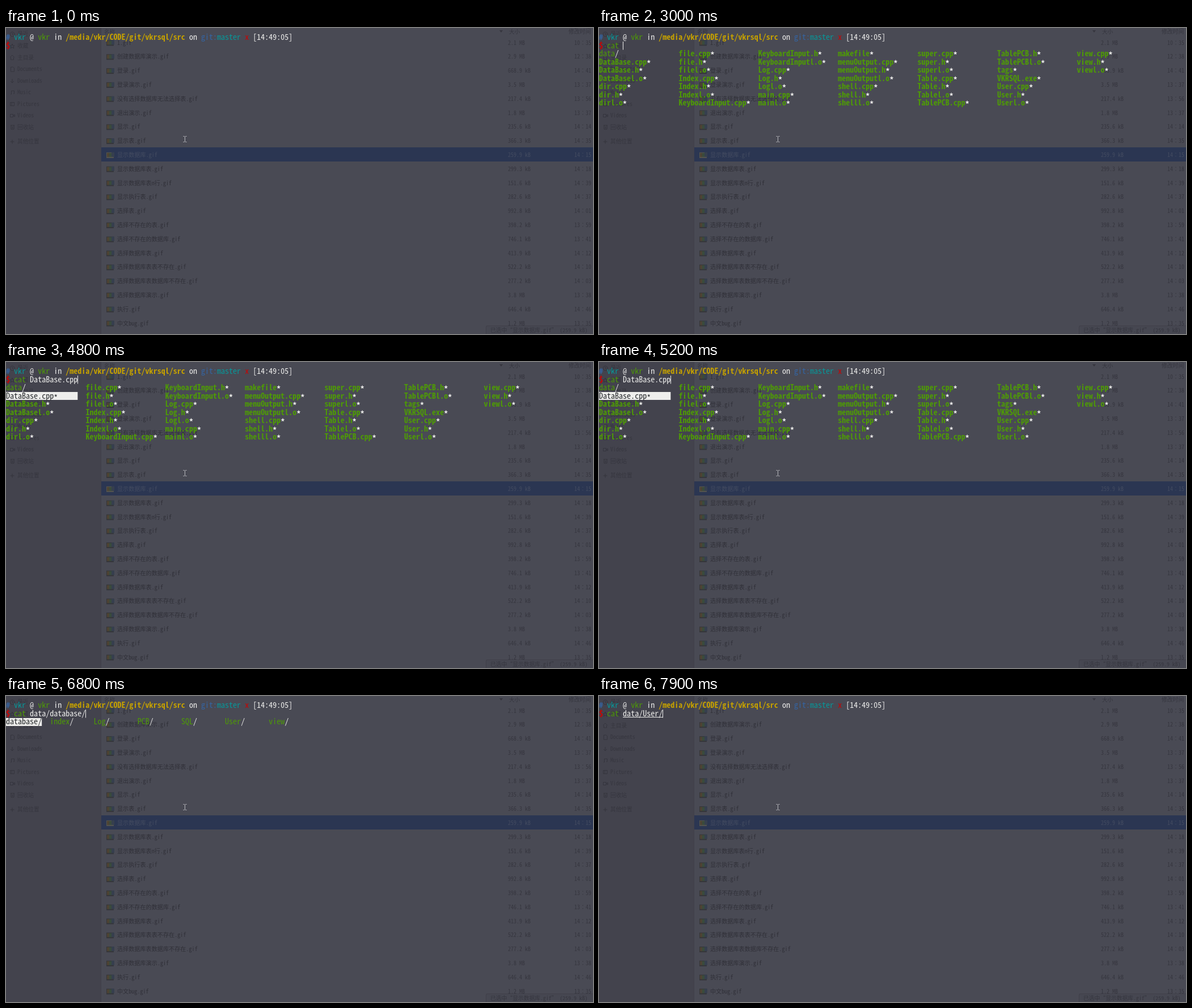
An HTML page that plays this animation: 1035 px wide and 541 px high, repeating every 8000 ms.

```html
<!DOCTYPE html>
<html lang="zh-CN">
<head>
<meta charset="utf-8">
<title>Terminal completion</title>
<style>
html, body { margin: 0; width: 100%; height: 100%; overflow: hidden; background: #494a54; }
svg { display: block; width: 1035px; height: 541px; }
text {
  font-family: "Noto Sans Mono CJK SC", "Noto Sans Mono", "Noto Sans CJK SC", "DejaVu Sans Mono", monospace;
  white-space: pre;
}
.icon { fill: none; stroke: #34343d; stroke-width: 1; }
</style>
</head>
<body>
<svg viewBox="0 0 1035 541">
  <rect width="1035" height="541" fill="#494a54"/>
  <rect width="167" height="541" fill="#43434d"/>
  <rect x="167" width="1" height="541" fill="#40404a"/>
  <rect x="168" y="211" width="867" height="25" fill="#2b3652"/>
  <g id="files"></g>
  <g id="places"></g>
  <g id="prompt"></g>
  <g id="screen"></g>
  <path d="M312.5 191.5h2l1 1 1-1h2M315.500 192v9M312.500 201.500h2l1-1 1 1h2" fill="none" stroke="#b9b9be"/>
</svg>
<script>
const LOOP = 8000, CELL = 7.02, LINE = 14.55, SIZE = CELL * 2;
const C = {
  blue: '#3465a4', cyan: '#06989a', green: '#4e9a06', yellow: '#c4a000',
  red: '#cc0000', white: '#eeeeec', ghost: '#5f5f63', dark: '#303038', dim: '#36363f'
};
const byId = id => document.getElementById(id);

// Latin letters take half an em, whichever monospace font is found.
const pen = document.createElement('canvas').getContext('2d');
pen.font = '100px "Noto Sans Mono CJK SC", "Noto Sans Mono", "DejaVu Sans Mono", monospace';
const spacing = 0.5 - pen.measureText('M').width / 100;

function text(x, y, str, color, size, bold) {
  const runs = str.match(/[ -~]+|[^ -~]+/g) || [];
  const spans = runs.map(run => /[ -~]/.test(run)
    ? `<tspan style="letter-spacing:${(spacing * size).toFixed(3)}px">${run}</tspan>` : run);
  return `<text x="${x}" y="${y}" fill="${color}" font-size="${size}"${bold ? ' font-weight="700"' : ''}>${spans.join('')}</text>`;
}
const rect = (x, y, w, h, color) => `<rect x="${x}" y="${y}" width="${w}" height="${h}" fill="${color}"/>`;
const cell = (col, row, str, color, bold) =>
  text(col * CELL, 21 + row * LINE, str, color, SIZE, bold);

// File manager seen through the terminal
const files = `1|2.1 MB|10:35
创建数据库演示|2.9 MB|12:38
登录|668.9 kB|14:41
登录演示|3.5 MB|13:37
没有选择数据库无法选择表|217.4 kB|13:56
退出演示|1.8 MB|13:37
显示|235.6 kB|14:14
显示表|366.3 kB|14:35
显示数据库|259.9 kB|14:15
显示数据库表|299.3 kB|14:18
显示数据库表n行|151.6 kB|14:39
显示执行表|282.6 kB|14:37
选择表|992.8 kB|14:01
选择不存在的表|398.2 kB|13:59
选择不存在的数据库|746.1 kB|13:41
选择数据库表|413.9 kB|14:12
选择数据库表表不存在|522.2 kB|14:10
选择数据库表数据库不存在|277.2 kB|14:03
选择数据库演示|3.8 MB|13:38
执行|646.4 kB|14:46
中文bug|1.2 MB|13:35`.split('\n').map(line => line.split('|'));

function fileRow([name, size, time], i) {
  const mid = 26 + i * 24.8, y = mid + 3.6, active = i === 8;
  const color = active ? '#444c61' : C.dark;
  return rect(177, mid - 4.5, 13, 10, active ? '#55554f' : '#35363a')
    + rect(178, mid - 3.5, 4, 7, '#4d4334') + rect(182, mid - 3.5, 4, 7, '#3a4b3c')
    + rect(186, mid - 4.5, 5, 8, '#363f4e')
    + text(196, y, name + '.gif', color, 10.15)
    + text(885, y, size, active ? color : C.dim, 10)
    + text(1002, y, time.replace(':', '∶'), active ? color : C.dim, 10);
}

byId('files').innerHTML = files.map(fileRow).join('')
  + text(173, 9.5, '名称', C.dim, 9.6)
  + text(887, 9.5, '大小', C.dim, 9.6)
  + text(992, 9.5, '修改时间', C.dim, 9.8)
  + `<path d="M870 4h6l-3 4z" fill="${C.dim}"/>`
  + rect(846, 526, 189, 15, '#464751')
  + `<path d="M846.500 541v-12q0-2.500 2.500-2.500h186" fill="none" stroke="#40404a"/>`
  + text(854, 537.5, '已选中“显示数据库.gif” (259.9 kB)', C.dim, 9.8);

const places = [
  [11, '最近', 'M11 7a4 4 0 1 0 .1 0M11 9v2h2'],
  [32, '收藏', 'M11 28l1 3h3l-2 2 1 3-3-2-3 2 1-3-2-2h3z'],
  [52.5, '主目录', 'M7 52l4-4 4 4M8.500 52v4h5v-4'],
  [73, 'Documents', 'M8.500 69h4l2 2v6h-6z'],
  [94, 'Downloads', 'M11 90v7M8 94l3 3 3-3'],
  [114, 'Music', 'M9.500 117v-6h5v5M8 117h1.500M13 116h1.500'],
  [135, 'Pictures', 'M7.500 131.500h7v6h-7zM10 132v5'],
  [155, 'Videos', 'M7.500 152.500h5v5h-5zM12.500 155l3-2v4z'],
  [175.5, '回收站', 'M8 172h7M9 172v7h5v-7M11.500 174v4'],
  [201, '其他位置', 'M11 197.500v7M7.500 201h7']
];
byId('places').innerHTML = places.map(([y, label, d]) =>
  `<path class="icon" d="${d}"/>` + text(20, y + 3.4, label, C.dim, 9.7)).join('');

// Shell
const prompt = [
  [0, '#', C.blue, true], [2, 'vkr', C.cyan], [6, '@', C.white], [8, 'vkr', C.green],
  [12, 'in', C.white], [15, '/media/vkr/CODE/git/vkrsql/src', C.yellow, true],
  [46, 'on', C.white], [49, 'git:', C.blue], [53, 'master', C.cyan],
  [60, 'x', C.red], [62, '[14:49:05]', C.white]
];
byId('prompt').innerHTML = prompt.map(([col, str, color, bold]) => cell(col, 0, str, color, bold)).join('')
  + cell(0, 1, '$', C.red, true);

const menus = {
  src: {
    base: '', pitch: 20, width: 18, rows: 7,
    items: `data/ DataBase.cpp* DataBase.h* DataBasel.o* dir.cpp* dir.h* dirl.o*
      file.cpp* file.h* filel.o* Index.cpp* Index.h* Indexl.o* KeyboardInput.cpp*
      KeyboardInput.h* KeyboardInputl.o* Log.cpp* Log.h* Logl.o* main.cpp* mainl.o*
      makefile* menuOutput.cpp* menuOutput.h* menuOutputl.o* shell.cpp* shell.h* shelll.o*
      super.cpp* super.h* superl.o* Table.cpp* Table.h* Tablel.o* TablePCB.cpp*
      TablePCB.h* TablePCBl.o* tags* VKRSQL.exe* User.cpp* User.h* Userl.o*
      view.cpp* view.h* viewl.o*`.split(/\s+/)
  },
  data: {
    base: 'data/', pitch: 11, width: 9, rows: 1,
    items: 'database/ index/ Log/ PCB/ SQL/ User/ view/'.split(' ')
  }
};

function drawMenu(menu, pick) {
  return menu.items.map((item, i) => {
    const col = Math.floor(i / menu.rows) * menu.pitch, row = 2 + i % menu.rows;
    const name = item.slice(0, -1), mark = item.slice(-1);
    const active = i === pick, star = mark === '*', bold = star && !active;
    // The asterisk sits at mid-height, lower than the font places it.
    const markRow = star ? row + 0.2 : row;
    const bar = active
      ? rect(col * CELL, Math.round(9.6 + row * LINE), menu.width * CELL, 14, C.white) : '';
    return bar + cell(col, row, name, active ? '#25282b' : C.green, bold)
      + cell(col + name.length, markRow, mark, active ? '#25282b' : C.white, bold);
  }).join('');
}

const past = 'cat data/SQL/a';
const steps = [
  { at: 0, cmd: '', still: true },
  { at: 100, cmd: 'c', ghost: past.slice(1) },
  { at: 200, cmd: 'ca', ghost: past.slice(2) },
  { at: 500, cmd: 'cat', ghost: past.slice(3) },
  { at: 700, cmd: 'cat ', ghost: past.slice(4) },
  { at: 1200, cmd: 'cat ', ghost: past.slice(4), still: true },
  { at: 1800, cmd: 'cat ', ghost: past.slice(4) },
  { at: 2100, cmd: 'cat /', ghost: 'proc/self/environ', line: true },
  { at: 3000, cmd: 'cat ', menu: menus.src },
  ...[[3600, 0], [3900, 1], [4400, 2], [4800, 1], [5000, 0], [5200, 1], [5700, 0]]
    .map(([at, pick]) => ({ at, pick, menu: menus.src })),
  { at: 6100, cmd: 'cat data/', ghost: 'SQL/a', line: true },
  { at: 6200, cmd: 'cat data/', line: true, menu: menus.data },
  ...[6800, 6900, 7100, 7300, 7400, 7600].map((at, pick) => ({ at, pick, menu: menus.data })),
  { at: 7900, cmd: 'cat data/User/', line: true }
];

function drawStep({ cmd, ghost = '', line, still, menu, pick }) {
  if (pick >= 0) cmd = 'cat ' + menu.base + menu.items[pick].replace('*', '');
  const verb = cmd.slice(0, 3), arg = cmd.slice(4), end = 2 + cmd.length;
  let out = cell(2, 1, verb, verb === 'cat' ? C.green : C.red, verb !== 'cat')
    + cell(6, 1, arg, C.white) + cell(end, 1, ghost, C.ghost);
  if (line) out += rect(6 * CELL, 37, arg.length * CELL, 1, C.white);
  if (menu) out += drawMenu(menu, pick);
  if (!still) out += rect(Math.round(end * CELL), 24, 1, 14.5, C.white);
  return out;
}

const start = performance.now();
let shown;
function tick() {
  const t = (performance.now() - start) % LOOP;
  const step = steps.filter(s => s.at <= t).pop();
  if (step !== shown) {
    byId('screen').innerHTML = drawStep(step);
    shown = step;
  }
  requestAnimationFrame(tick);
}
tick();
</script>
</body>
</html>
```
